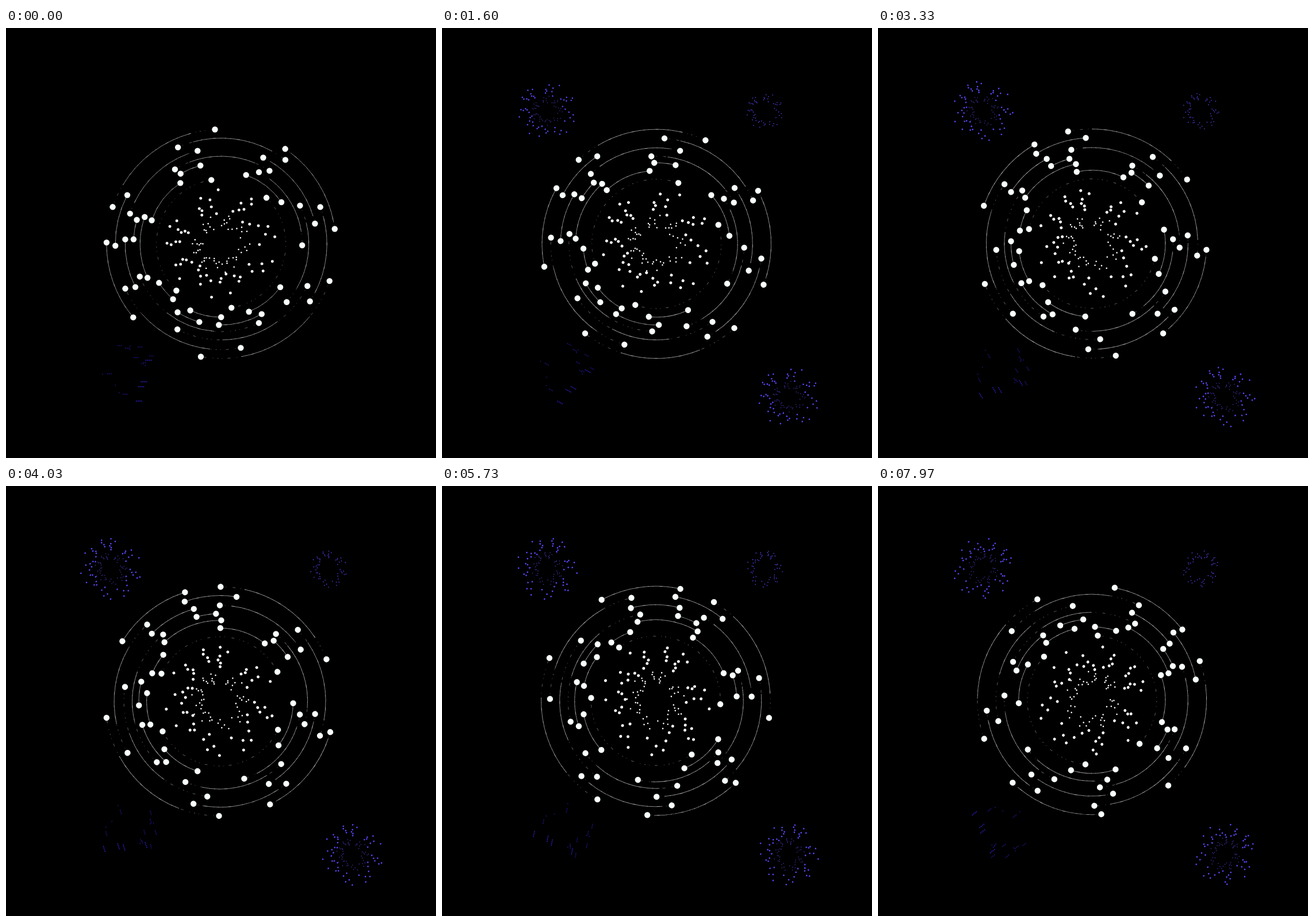
Recreate the animation shown at these times as an HTML page with a canvas. Size 748x748 px, loop 8000 ms.

```html
<!DOCTYPE html>
<html lang="en">
<head>
<meta charset="utf-8">
<title>Orbiting dots</title>
<style>
  html, body { margin: 0; width: 100%; height: 100%; overflow: hidden; background: #000; }
  canvas { display: block; width: 748px; height: 748px; }
</style>
</head>
<body>
<canvas id="stage" width="748" height="748"></canvas>
<script>
const ctx = document.getElementById('stage').getContext('2d');
const LOOP = 8000, FPS = 30, SPIN = 17.74, TAU = Math.PI * 2;
const DOT = 5.2, MID = .4725, CORE = .25, CORE_LAG = 18.5;
const rad = deg => deg * Math.PI / 180;
const clamp = v => Math.max(0, Math.min(1, v));

// One figure serves every cluster: each arc runs between two dots, in degrees.
const rings = [
  { r: 199.3, arcs: [[18.9, 100.2], [140.1, 180.7], [198.8, 266.9], [304, 352.5]] },
  { r: 184, arcs: [[-20.4, 32.9], [79.3, 155], [179, 207.5], [245.9, 307.4]] },
  { r: 167, arcs: [[26, 117.1], [153.3, 182.7], [198.4, 255.8], [296, 347.8]] },
  { r: 152.5, arcs: [[-25.9, 41.6], [64.5, 158.1], [183, 195.9], [238.2, 303.5]] },
  { r: 141, arcs: [[60, 91.6], [105.6, 122.5], [155.3, 199.4], [240, 255.2], [297.8, 361]] },
  { r: 127.5, arcs: [[36.2, 67.7], [90, 114.9], [131, 147.9], [198.8, 236.2], [289.9, 325.3]] },
  { r: 112.5, arcs: [[133.8, 261.3], [-45.5, 80.8]] }
];

function seeded(seed) {
  return () => (seed = (seed * 16807) % 2147483647) / 2147483647;
}

// Parallel rows of specks: a few bright ones, the rest scattered faintly.
const rand = seeded(41);
const streaks = [[34, -22], [26, 15.5], [21, 24], [17.5, 49]]
  .map(([x, y]) => ({ x, y, count: 4, alpha: 1 }));
for (let i = 0; i < 15; i++) {
  const a = rad(100 + 240 * rand()), r = 28 + 25 * rand();
  streaks.push({ x: r * Math.cos(a), y: r * Math.sin(a), count: 1 + Math.floor(3 * rand()), alpha: .65 });
}

function dot(x, y, r) {
  ctx.beginPath();
  ctx.arc(x, y, r, 0, TAU);
  ctx.fill();
}

// Runs paint with the origin at the figure's centre, which sits slightly off the pivot.
function place(x, y, scale, turn, paint) {
  ctx.save();
  ctx.translate(x, y);
  ctx.scale(scale, scale);
  ctx.rotate(rad(turn));
  ctx.translate(.43, 1.95);
  paint();
  ctx.restore();
}

function drawDots(scale, lag, color) {
  ctx.fillStyle = color;
  for (const { r, arcs } of rings) {
    for (const deg of arcs.flat()) {
      const a = rad(deg - lag);
      dot(r * scale * Math.cos(a), r * scale * Math.sin(a), DOT * scale);
    }
  }
}

function strokeArc(r, from, to, alpha, dash) {
  ctx.strokeStyle = `rgba(255,255,255,${alpha})`;
  ctx.setLineDash(dash);
  ctx.beginPath();
  ctx.arc(0, 0, r, rad(from), rad(to));
  ctx.stroke();
}

// The longer an arc, the smaller its solid middle and the more of it is dotted.
function drawArcs() {
  ctx.lineWidth = 1;
  for (const { r, arcs } of rings) {
    for (const [from, to] of arcs) {
      const span = to - from, middle = (from + to) / 2;
      const half = span * clamp(1.4 - span / 90) / 2;
      strokeArc(r, from, to, .35, [2, 7, 1, 11, 5, 9, 1, 6]);
      if (half > 0) strokeArc(r, middle - half, middle + half, .5, []);
    }
  }
  ctx.setLineDash([]);
}

function drawStreaks() {
  ctx.fillStyle = '#3826f0';
  for (const { x, y, count, alpha } of streaks) {
    ctx.globalAlpha = alpha;
    for (let i = 0; i < count; i++) dot(x + (i - (count - 1) / 2) * 3, y, .85);
  }
}

function drawCluster() {
  drawDots(CORE, CORE_LAG, '#4a3cc0');
  drawDots(MID, 0, '#5846f4');
}

function drawMain() {
  drawArcs();
  drawDots(CORE, CORE_LAG, '#fff');
  drawDots(MID, 0, '#fff');
  drawDots(1, 0, '#f8fffe');
}

function draw(ms) {
  const t = Math.floor((ms + 5) * FPS / 1000) / FPS;
  const turn = SPIN * t;
  ctx.fillStyle = '#000';
  ctx.fillRect(0, 0, 748, 748);

  place(213.5, 598, 1, turn, drawStreaks);
  if (ms >= 30) {
    place(183.3, 143.7, .564 - .0022 * (t - 5.8) ** 2, turn, drawCluster);
    place(561.8, 144.3, .333, turn, () => drawDots(MID, 0, '#5846f4'));
  }
  if (ms >= 970) place(603.8, 641.1, .556, turn, drawCluster);
  place(373.8, 373.6, 1, turn, drawMain);
}

const begin = performance.now();
function tick() {
  draw((performance.now() - begin) % LOOP);
  requestAnimationFrame(tick);
}
tick();
</script>
</body>
</html>
```
